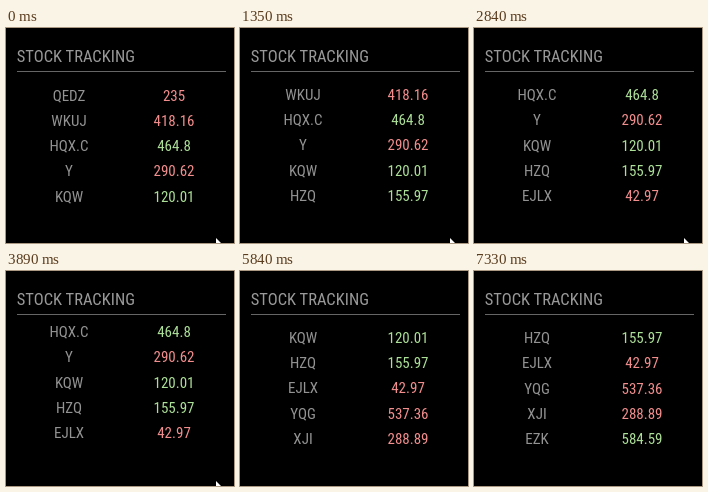
These frames come from a looping animation (228x215 px, 8000 ms). An HTML page:

```html
<!DOCTYPE html>
<html lang="en">
<head>
<meta charset="utf-8">
<title>Stock tracking</title>
<style>
  html, body { margin: 0; width: 100%; height: 100%; overflow: hidden; background: #000; }
  svg { display: block; }
  text {
    font-family: "Roboto Condensed", Roboto, sans-serif;
    font-stretch: condensed;
    font-weight: 400;
    fill: #999;
  }
  .title { font-size: 16.54px; }
  .row { font-size: 15px; text-anchor: middle; fill: #939393; }
  .row.up { fill: #acdf98; }
  .row.down { fill: #f28e8e; }
</style>
</head>
<body>
<svg id="stage" width="228" height="215" viewBox="0 0 228 215">
  <clipPath id="window"><rect x="0" y="55" width="228" height="126"/></clipPath>
  <rect width="228" height="215" fill="#000"/>
  <g id="head"></g>
  <rect x="11" y="43" width="209" height="1" fill="#666"/>
  <g id="list" clip-path="url(#window)"></g>
  <path id="pointer" d="M210 210V215H215Z" fill="#fff"/>
</svg>
<script>
const LOOP = 8000, TICK = 149.7;
const ROW = 25.28, BASE = 73;
const FIRST = 732, GAP = 1519, SLIDE = 500, SLIDES = 5;

const stocks = [
  ["QEDZ", "235", "down"],
  ["WKUJ", "418.16", "down"],
  ["HQX.C", "464.8", "up"],
  ["Y", "290.62", "down"],
  ["KQW", "120.01", "up"],
  ["HZQ", "155.97", "up"],
  ["EJLX", "42.97", "down"],
  ["YQG", "537.36", "down"],
  ["XJI", "288.89", "down"],
  ["EZK", "584.59", "up"]
];

const $ = id => document.getElementById(id);

function addText(parent, cls, str) {
  const el = document.createElementNS("http://www.w3.org/2000/svg", "text");
  el.setAttribute("class", cls);
  el.textContent = str;
  parent.appendChild(el);
  return el;
}

const title = addText($("head"), "title", "STOCK TRACKING");
const rows = stocks.map(([name, price, trend]) => [
  [addText($("list"), "row", name), 63],
  [addText($("list"), "row " + trend, price), 168]
]);

// Narrow the letters when only the regular width is available.
const narrow = title.getComputedTextLength() / 16.54 > 7.7 ? 0.88 : 1;

function place(el, x, y) {
  el.setAttribute("transform", `translate(${x} ${y}) scale(${narrow} 1)`);
}

function scrolled(t) {
  let sum = 0;
  for (let i = 0; i < SLIDES; i++) {
    const p = (t - FIRST - i * GAP) / SLIDE;
    sum += Math.min(1, Math.max(0, p));
  }
  return sum * ROW;
}

// Rows sit on whole pixels in the list, and the list moves by whole pixels.
function draw(t) {
  const n = Math.floor((t + 6) / TICK);
  const top = BASE - Math.ceil(scrolled(n * TICK + 2));
  rows.forEach((cells, i) => {
    const y = top + Math.floor(i * ROW + 0.1);
    cells.forEach(([el, x]) => place(el, x, y));
  });
  $("pointer").style.display = t < 4040 ? "" : "none";
}

place(title, 10.8, 34);
const start = performance.now();
function frame() {
  draw((performance.now() - start) % LOOP);
  requestAnimationFrame(frame);
}
draw(0);
requestAnimationFrame(frame);
</script>
</body>
</html>
```
